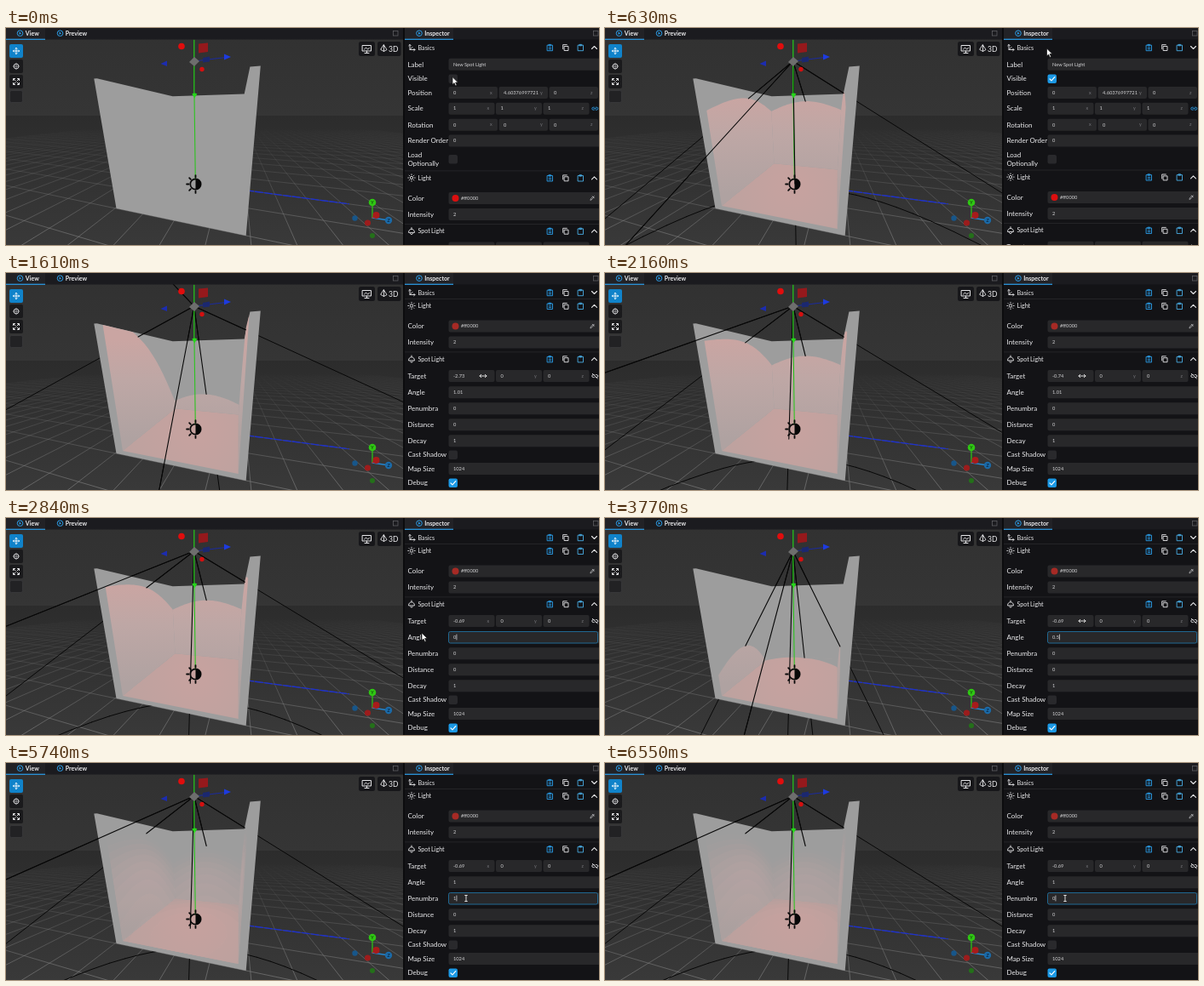
These frames come from a looping animation (696 px wide and 255 px high, 6620 ms). An HTML page:

```html
<!DOCTYPE html>
<html lang="en">
<head>
<meta charset="utf-8">
<title>Spot light editor</title>
<style>
html, body { margin: 0; width: 100%; height: 100%; overflow: hidden; background: #131316; }
svg { display: block; width: 696px; height: 255px; }
text { font-family: Lato, "Open Sans", sans-serif; font-size: 8px; fill: #ececee; }
.head { font-size: 7.2px; word-spacing: -.8px; }
.val { font-size: 5.7px; fill: #d6d6d8; }
.axis { font-size: 5.4px; fill: #77777c; }
.tab { font-weight: 700; font-size: 7px; }
.ln { fill: none; stroke-linecap: round; stroke-linejoin: round; }
</style>
</head>
<body>
<svg id="stage" viewBox="0 0 696 255" xmlns="http://www.w3.org/2000/svg"></svg>
<script>
const LOOP = 6620;
const BLUE = '#2b9de8', WHITE = '#e6e6e8';

// ---------- camera ----------
const FOCAL = 156.4, CX = 233, CY = 135, NEAR = 0.05;
const ORIGIN = [-0.356, 1.707, 5.561];
const AX = [0.2418, -0.2177, 0.9456], AZ = [0.9703, 0.0542, -0.2356], DOWN = [0, 0.9745, 0.2243];
const LIGHT_Y = 4.604, TOP = 3.72, IN = 1.86, RIGHT = 1.72, FRONT = -1.85;

const toCam = ([x, y, z]) => ORIGIN.map((o, i) => o + x * AX[i] + z * AZ[i] - y * DOWN[i]);
const toScreen = c => [CX + FOCAL * c[0] / c[2], CY + FOCAL * c[1] / c[2]];
const fmt = p => p[0].toFixed(1) + ' ' + p[1].toFixed(1);
const project = p => fmt(toScreen(toCam(p)));
const poly = pts => 'M' + pts.map(project).join('L') + 'Z';

function segment(a, b) {
  let p = toCam(a), q = toCam(b);
  if (p[2] < NEAR && q[2] < NEAR) return '';
  const cut = (f, g) => {
    const k = (NEAR - f[2]) / (g[2] - f[2]);
    return f.map((n, i) => n + (g[i] - n) * k);
  };
  if (p[2] < NEAR) p = cut(p, q);
  else if (q[2] < NEAR) q = cut(q, p);
  return 'M' + fmt(toScreen(p)) + 'L' + fmt(toScreen(q));
}

// ---------- light cone ----------
function axisOf(target) {
  const n = Math.hypot(target, LIGHT_Y);
  return [target / n, LIGHT_Y / n];
}

// Height up to which a wall column is lit
function litHeight(x, z, axis, angle) {
  const c = Math.cos(angle);
  const inside = h => (x * axis[0] + h * axis[1]) / Math.hypot(x, h, z) > c;
  let lo = LIGHT_Y - TOP, hi = LIGHT_Y;
  if (!inside(hi)) return 0;
  if (inside(lo)) return TOP;
  for (let i = 0; i < 14; i++) {
    const m = (lo + hi) / 2;
    if (inside(m)) hi = m; else lo = m;
  }
  return LIGHT_Y - hi;
}

function wallPath(at, from, to, axis, angle) {
  const pts = [];
  for (let i = 0; i <= 36; i++) {
    const [x, z] = at(from + (to - from) * i / 36);
    pts.push([x, litHeight(x, z, axis, angle), z]);
  }
  const a = at(from), b = at(to);
  return poly([...pts, [b[0], 0, b[1]], [a[0], 0, a[1]]]);
}

function floorPath(axis, angle) {
  const near = [], far = [];
  for (let i = 0; i <= 36; i++) {
    const x = FRONT + (IN - FRONT) * i / 36;
    const reach = (x * axis[0] + LIGHT_Y * axis[1]) / Math.cos(angle);
    const z2 = reach * reach - x * x - LIGHT_Y * LIGHT_Y;
    if (reach < 0 || z2 <= 0) continue;
    const z = Math.sqrt(z2);
    near.push([x, 0, -Math.min(z, IN)]);
    far.unshift([x, 0, Math.min(z, RIGHT)]);
  }
  return near.length ? poly([...near, ...far]) : '';
}

function litPaths(axis, angle) {
  return [
    floorPath(axis, angle),
    wallPath(s => [s, -IN], FRONT, IN, axis, angle),
    wallPath(s => [IN, s], -IN, RIGHT, axis, angle),
    wallPath(s => [s, RIGHT], FRONT, IN, axis, angle)
  ];
}

// Distance along a ray to the first surface of the room
function firstHit(d) {
  let best = 1000;
  const test = (t, ok) => {
    if (t > 0 && t < best && ok(d[0] * t, LIGHT_Y + d[1] * t, d[2] * t)) best = t;
  };
  test(-LIGHT_Y / d[1], (x, y, z) => Math.abs(x) < 2 && Math.abs(z) < 2);
  test(IN / d[0], (x, y, z) => y > 0 && y < TOP && Math.abs(z) < IN);
  const side = (x, y) => y > 0 && y < TOP && x > -2 && x < IN;
  test(-IN / d[2], side);
  test(RIGHT / d[2], side);
  return best;
}

function conePaths(axis, angle) {
  const w = Math.tan(angle);
  const dir = phi => [
    axis[0] + w * Math.cos(phi) * axis[1],
    -axis[1] + w * Math.cos(phi) * axis[0],
    w * Math.sin(phi)
  ];
  const at = (d, t) => [d[0] * t, LIGHT_Y + d[1] * t, d[2] * t];
  const rays = [0, 1, 2, 3].map(i => dir(i * Math.PI / 2));
  rays.push([axis[0], -axis[1], 0]);
  let back = '', front = '';
  for (const d of rays) {
    back += segment(at(d, 0), at(d, 1000));
    front += segment(at(d, 0), at(d, firstHit(d)));
  }
  for (let i = 0; i < 72; i++)
    back += segment(at(dir(i * Math.PI / 36), 1000), at(dir((i + 1) * Math.PI / 36), 1000));
  return { back, front };
}

// ---------- drawing helpers ----------
const rect = (x, y, w, h, fill, more = '') =>
  `<rect x="${x}" y="${y}" width="${w}" height="${h}" fill="${fill}" ${more}/>`;
const dot = (x, y, r, fill, more = '') => `<circle cx="${x}" cy="${y}" r="${r}" fill="${fill}" ${more}/>`;
const line = (d, color, w = 1, more = '') =>
  `<path class="ln" d="${d}" stroke="${color}" stroke-width="${w}" ${more}/>`;
const text = (x, y, s, cls = '', more = '') => `<text x="${x}" y="${y}" class="${cls}" ${more}>${s}</text>`;
const field = (x, y, w) => rect(x - .5, y - 7, w + .5, 14, '#28282a', 'rx="2"');
const label = (y, s) => text(471.5, y + 2.7, s);
const value = (x, y, s, id) => text(x, y + 1.7, s, 'val', id ? `id="${id}"` : '');
const row = (y, name, val, id) => label(y, name) + field(520, y, 178) + value(525, y, val, id);
const box = (y, on) => rect(519.5, y - 5, 10.5, 10.5, on ? '#1b98e4' : '#29292c', 'rx="2"') +
  (on ? line(`M522 ${y + .4}l2 2 3.8-4.2`, '#fff', 1.2) : '');

function triple(y, name, vals, w, id) {
  let out = label(y, name);
  vals.forEach((v, i) => {
    const x = 520 + i * (w + 2);
    out += field(x, y, w) + value(x + 5, y, v, i ? '' : id) +
      text(x + w - 9, y + 1.6, 'xyz'[i], 'axis', id && !i ? 'id="axisX"' : '');
  });
  return out;
}

function clip(x, y, color, lines) {
  return line(`M${x - 3} ${y - 2.8}h6v6.5h-6zM${x - 1.2} ${y - 3.6}h2.4v1.4h-2.4z` +
    (lines ? `M${x - 1.3} ${y}h2.6M${x - 1.3} ${y + 1.8}h2.6` : ''), color, .9);
}

const chevron = (y, up) => line(up ? `M687.5 ${y + 1.5}l3-3 3 3` : `M687.5 ${y - 1.5}l3 3 3-3`, WHITE, 1.1);
const header = (y, name, icon) => icon + text(483.5, y + 2.5, name, 'head') + clip(638.5, y, BLUE, true) +
  line(`M${655.5} ${y - 1.5}h4.5v5h-4.5zM653.7 ${y + 1.6}v-5h4.6`, WHITE, .9) + clip(674.5, y, '#4aaee6', false);

const tab = (x, s) => dot(x, 6.2, 3.3, 'none', `stroke="${BLUE}"`) +
  `<path d="M${x - 1} 4.6l2.6 1.6-2.6 1.6z" fill="${BLUE}"/>` + text(x + 6.3, 8.8, s, 'tab');
const corner = x => rect(x, 3.5, 5.5, 5.5, 'none', 'stroke="#66666a" stroke-width=".7"');

// ---------- view ----------
function grid() {
  let d = '';
  for (let i = -24; i <= 24; i++)
    d += segment([i, 0, -24], [i, 0, 24]) + segment([-24, 0, i], [24, 0, i]);
  return line(d, 'url(#gridFade)', .8);
}

const roomShape = poly([
  [-2, 0, -1.95], [-2, TOP, -1.95], [-2, TOP, -IN], [IN, TOP, -1.8], [IN, TOP, 1.77],
  [-2, TOP, RIGHT], [-2, TOP, 1.9], [-2, 0, 1.9]
]);

function ambientIcon() {
  let rays = '';
  for (let i = 2; i <= 6; i++) {
    const a = i * Math.PI / 4, c = Math.cos(a), s = Math.sin(a);
    rays += `M${222.5 + 8 * c} ${183.5 + 8 * s}l${2.4 * c} ${2.4 * s}`;
  }
  return dot(222.5, 183.5, 6.2, 'none', 'stroke="#080808" stroke-width="1.7"') +
    '<path d="M222.5 177.3a6.2 6.2 0 0 1 0 12.4z" fill="#080808"/>' + line(rays, '#080808', 1.8);
}

function gizmo() {
  return line('M221 39L258 34.5', '#1b2b9c', 1.1) +
    line('M220.8 14V79', '#22cc18', 1.2) +
    '<path d="M181.500 42l7.500-3.500v6.500z" fill="#1c2cb0"/><path d="M264 34l-8-3.500v7z" fill="#1d3be0"/>' +
    '<path d="M226 18.500l11-1v10.500l-11 1.500z" fill="#95191c"/>' +
    '<path d="M231 35l8-1.500v6l-8 1z" fill="#1b2870"/>' +
    '<path d="M221 34l6 5-6 6-6-5z" fill="#6e6e6e"/>' +
    dot(206, 21.5, 3.8, '#e00d0d') + dot(230, 48.5, 2.7, '#d41010') +
    '<path d="M218.300 77.500q3-2 6 0l-3 5z" fill="#27d61b"/>';
}

function compass() {
  return line('M430 223V207', '#2fbf17', 1.3) + line('M430 223L446 225.500', '#2386d0', 1.3) +
    line('M430 223L435 219.500', '#c02020', 1.3) +
    dot(409.5, 223.5, 3.2, '#17568a') + dot(430, 244, 3, '#24701a') + dot(424.5, 229, 3.6, '#9c1c1c') +
    dot(434.5, 220, 4, '#a81b1b') + dot(430, 205, 4.3, '#2fc713') +
    dot(449, 226, 4.2, '#1b6aa8') +
    text(430, 207, 'Y', 'axis', 'text-anchor="middle" style="fill:#0c2a08"') +
    text(449, 228, 'Z', 'axis', 'text-anchor="middle" style="fill:#06182a"');
}

function toolbar() {
  const btn = (y, fill) => rect(4, y, 16, 16, fill, 'rx="2"');
  return btn(19, '#1083ca') + btn(37, '#1a1a1c') + btn(55, '#1a1a1c') +
    rect(4.5, 73.5, 15, 14, '#222224', 'rx="2" stroke="#3d3d40" stroke-width=".7"') +
    line('M12 23.500v7M8.500 27h7M11 24.300l1-1 1 1M11 29.700l1 1 1-1M9.300 26l-1 1 1 1M14.700 26l1 1-1 1', '#fff', .9) +
    dot(12, 45, 2.9, 'none', 'stroke="#e6e6e8" stroke-width=".9"') +
    line('M8.300 45h7.400M12 41.300v7.400', '#b8b8ba', .7) +
    line('M8.500 61.500v-2h2M13.500 59.500h2v2M15.500 64.500v2h-2M10.500 66.500h-2v-2M9 60l2 2M15 60l-2 2M15 66l-2-2M9 66l2-2', WHITE, 1) +
    rect(414, 16, 19, 17, '#17171a', 'rx="2.500"') + rect(436, 16, 27.5, 17, '#17171a', 'rx="2.500"') +
    line('M418.500 20.500h10v6.500h-10zM421 29.500h5M423.500 27v2.500M420.500 25l2-2 2 2 2-1.500', WHITE, 1) +
    line('M443.500 20l3.500 5.500-3.500 2-3.500-2zM443.500 20v7.500', WHITE, .9) +
    text(449, 28.2, '3D', '', 'style="font-size:8.500px"');
}

const view = `
  ${rect(0, 0, 466, 255, 'url(#sky)')}
  ${rect(0, 103, 466, 152, 'url(#ground)')}
  <g clip-path="url(#viewClip)">
    ${grid()}
    ${line(segment([0, 0, 2], [0, 0, 5.2]), '#1b2fd0', 1.3, 'stroke-dasharray="9 2"')}
    <path id="rayBack" class="ln" stroke="#070707" stroke-width="1"/>
    <path d="${roomShape}" fill="#9d9d9d"/>
    <g id="lit"></g>
    ${line('M221 79L222.300 178', '#2cc41f', 1.1)}
    <path id="rayFront" class="ln" stroke="#070707" stroke-width="1.1"/>
    ${gizmo()}${ambientIcon()}${compass()}${toolbar()}
  </g>
  ${rect(0, 0, 466, 13.5, '#1b1b1f')}${rect(0, 0, 46, 13.5, '#222226')}
  ${tab(16.5, 'View')}${tab(63.5, 'Preview')}${rect(0, 12.7, 46, 1.2, BLUE)}${corner(454.5)}
  ${rect(466, 0, 2, 255, '#0c0c0e')}`;

// ---------- inspector ----------
const basicsIcon = line('M474 19.500v6h6M474 25.500l3-3M472.700 20.800l1.300-1.300 1.300 1.300M478.700 24.200l1.300 1.300-1.300 1.300', WHITE, .9);
const lightIcon = dot(476, 176, 1.7, 'none', 'stroke="#e6e6e8" stroke-width=".9"') +
  line('M476 171.800v.800M476 179.400v.800M471.800 176h.800M479.400 176h.800M473.100 173.100l.500.500M478.400 178.400l.500.500M473.100 178.900l.500-.500M478.400 173.600l.500-.500', WHITE, .9);
const spotIcon = line('M472.500 240c0-5 7-5 7 0zM474.500 241.500c.500 1.500 2.500 1.500 3 0M476 236v-1.500', WHITE, .9);
const link = (y, color, broken) => line(`M690.3 ${y - 1.5}h-1a1.500 1.500 0 0 0 0 3h1M692.3 ${y - 1.5}h1a1.500 1.500 0 0 1 0 3h-1` +
  (broken ? `M688.3 ${y - 2.8}l6 5.6` : `M690 ${y}h2.500`), color, .9);
const rule = y => rect(468, y, 228, .8, '#29292c');

const panel = `
  ${rect(468, 0, 228, 255, '#131316')}
  <g clip-path="url(#bodyClip)">
    ${row(42.8, 'Label', 'New Spot Light')}
    ${label(59.5, 'Visible')}<g id="visOff">${box(59.5, false)}</g><g id="visOn">${box(59.5, true)}</g>
    ${triple(76, 'Position', [0, '4.60376997721', 0], 57)}
    ${triple(94.7, 'Scale', [1, 1, 1], 53.5)}${link(94.7, BLUE)}
    ${triple(113.8, 'Rotation', [0, 0, 0], 57)}
    ${row(132.6, 'Render Order', 0)}
    ${label(149.5, 'Load')}${label(159.5, 'Optionally')}${box(154, false)}
  </g>
  ${header(23, 'Basics', basicsIcon)}<g id="open">${chevron(23, true)}</g><g id="shut">${chevron(23, false)}</g>
  <g id="lower">
    ${rule(167.5)}${header(176.3, 'Light', lightIcon)}${chevron(176.3, true)}
    ${label(200, 'Color')}${field(520, 200, 178)}<circle id="swatch" cx="527.500" cy="200" r="4"/>${value(534, 200, '#ff0000')}
    ${line('M686 202l.400-1.400 2.400-2.400 1 1-2.400 2.400zM688.300 197.700l2 2M689.300 198.700l1-1', '#c8c8ca', .7)}
    ${row(219, 'Intensity', 2)}
    ${rule(230)}${header(238.7, 'Spot Light', spotIcon)}${chevron(238.7, true)}
    ${triple(258.6, 'Target', ['0', 0, 0], 53.5, 'target')}${link(258.6, WHITE, true)}
    ${row(277.7, 'Angle', '1.01', 'angle')}
    ${row(296.7, 'Penumbra', 0, 'pen')}
    ${row(315.7, 'Distance', 0)}
    ${row(334.7, 'Decay', 1)}
    ${label(351, 'Cast Shadow')}${box(351, false)}
    ${row(367.5, 'Map Size', 1024)}
    ${label(384, 'Debug')}${box(384, true)}
  </g>
  <rect id="ring" x="519.500" width="175" height="13.500" rx="2" fill="none" stroke="#20709f" stroke-width=".9"/>
  <path id="caret" class="ln" stroke="#e6e6e8" stroke-width=".7"/>
  ${rect(468, 0, 228, 13.5, '#1b1b1f')}${rect(468, 0, 57, 13.5, '#222226')}
  ${tab(485, 'Inspector')}${rect(468, 12.7, 57, 1.2, BLUE)}${corner(689.5)}`;

const LAYERS = 12;
const stage = document.getElementById('stage');
stage.innerHTML = `<defs>
  <linearGradient id="sky" x2="0" y2="1"><stop stop-color="#313131"/><stop offset=".4" stop-color="#353535"/><stop offset="1" stop-color="#353535"/></linearGradient>
  <linearGradient id="ground" x2="0" y2="1"><stop stop-color="#2c2c2c"/><stop offset="1" stop-color="#393939"/></linearGradient>
  <linearGradient id="gridFade" gradientUnits="userSpaceOnUse" x1="0" y1="118" x2="0" y2="255">
    <stop stop-color="#777" stop-opacity="0"/><stop offset=".35" stop-color="#777" stop-opacity=".3"/><stop offset="1" stop-color="#888" stop-opacity=".75"/></linearGradient>
  <linearGradient id="wall" gradientUnits="userSpaceOnUse" x1="0" y1="78" x2="0" y2="195">
    <stop stop-color="#caa5a2"/><stop offset=".4" stop-color="#bea7a5"/><stop offset="1" stop-color="#afa2a1"/></linearGradient>
  <radialGradient id="floor" gradientUnits="userSpaceOnUse" cx="222" cy="183" r="95">
    <stop stop-color="#c7a29f"/><stop offset="1" stop-color="#bca29f"/></radialGradient>
  <clipPath id="viewClip"><rect y="13" width="466" height="242"/></clipPath>
  <clipPath id="bodyClip"><rect id="bodyRect" x="468" y="31" width="228" height="137"/></clipPath>
</defs>${view}${panel}
<path id="arrow" d="M0 0v9l2.100-1.900 1.500 3.300 1.500-.700-1.500-3.200h2.900z" fill="#fff" stroke="#111" stroke-width=".7"/>
<path id="resize" class="ln" d="M-4 0h8M-2.300-1.700l-1.700 1.700 1.700 1.700M2.300-1.700l1.700 1.700-1.700 1.700" stroke="#eee" stroke-width=".9"/>
<path id="beam" class="ln" d="M-1.300-3.500h2.600M0-3.500v7M-1.300 3.500h2.600" stroke="#eee" stroke-width=".9"/>`;

const $ = id => document.getElementById(id);
const show = (id, on) => $(id).setAttribute('display', on ? 'inline' : 'none');
$('lit').innerHTML = Array.from({ length: LAYERS }, () => '<g>' +
  ['floor', 'wall', 'wall', 'wall'].map(f => `<path fill="url(#${f})"/>`).join('') + '</g>').join('');
const layers = [...$('lit').children];

// ---------- timeline ----------
const clamp = x => Math.max(0, Math.min(1, x));
const smooth = x => x * x * (3 - 2 * x);

// Eased value from [time, value] keys
function track(keys, t) {
  if (t <= keys[0][0]) return keys[0][1];
  for (let i = 1; i < keys.length; i++) {
    const [t0, a] = keys[i - 1], [t1, b] = keys[i];
    if (t < t1) return a + (b - a) * smooth((t - t0) / (t1 - t0));
  }
  return keys[keys.length - 1][1];
}
// Latest held value
const hold = (keys, t) => keys.reduce((v, k) => t >= k[0] ? k[1] : v, keys[0][1]);

const targetKeys = [[1000, 0], [1050, -.01], [1610, -2.73], [1760, -2.95], [2200, -.69]];
const angleKeys = [[0, 1.01], [3240, .5], [4370, 1]];
const angleText = [[0, '1.01'], [2780, ''], [2840, '0'], [3170, '0.'], [3240, '0.5'], [4040, '0.'], [4180, '0'], [4250, ''], [4370, '1']];
const penText = [[0, '0'], [5670, ''], [5740, '1'], [6410, ''], [6480, '0']];
const mouseX = [[210, 524], [560, 518.5], [700, 518.5], [1000, 561], [2230, 561], [2480, 536], [2560, 536], [2760, 488],
  [3690, 488], [3770, 561], [4880, 561], [4900, 541], [5500, 540]];
const mouseY = [[210, 57.5], [560, 24], [700, 24], [1000, 121], [2230, 121], [2480, 140], [2560, 140], [2760, 135],
  [3690, 135], [3770, 121], [4880, 121], [4900, 110.5], [5000, 112], [5500, 159]];

let sceneKey = '';
function drawScene(lit, target, angle, soft) {
  const key = [lit, target, angle, soft].join();
  if (key === sceneKey) return;
  sceneKey = key;
  show('lit', lit); show('rayBack', lit); show('rayFront', lit);
  if (!lit) return;
  const axis = axisOf(target), cone = conePaths(axis, angle);
  $('rayBack').setAttribute('d', cone.back);
  $('rayFront').setAttribute('d', cone.front);
  const edge = Math.cos(angle);
  let sum = 0;
  layers.forEach((g, i) => {
    const used = soft || i === 0;
    g.setAttribute('display', used ? 'inline' : 'none');
    if (!used) return;
    const k = i / LAYERS;
    const a = soft ? Math.acos(edge + (1 - edge) * k) : angle;
    const level = soft ? smooth((i + .5) / LAYERS) : 1;
    g.setAttribute('opacity', ((level - sum) / (1 - sum)).toFixed(3));
    sum = Math.min(level, .999);
    litPaths(axis, a).forEach((d, j) => g.children[j].setAttribute('d', d));
  });
}

function render(t) {
  const on = t >= 140;
  const target = track(targetKeys, t);
  drawScene(on, target, hold(angleKeys, t), t >= 5740);

  show('visOn', on); show('visOff', !on);
  show('open', t < 620); show('shut', t >= 620);
  const fold = smooth(clamp((t - 620) / 230)) * 137.5;
  $('lower').setAttribute('transform', `translate(0 ${-fold.toFixed(2)})`);
  $('bodyRect').setAttribute('height', Math.max(0, 137 - fold));
  $('swatch').setAttribute('fill', t < 700 ? '#dc0f0f' : '#a62a25');

  $('target').textContent = t < 1010 ? '0' : target.toFixed(2);
  $('angle').textContent = hold(angleText, t);
  $('pen').textContent = hold(penText, t);

  const inAngle = t >= 2500 && t < 5600, inPen = t >= 5600;
  show('ring', inAngle || inPen);
  $('ring').setAttribute('y', inPen ? 152.5 : 133.5);

  const typed = (t >= 2780 && t < 4500) || t >= 5670;
  show('caret', typed);
  const cx = 525.6 + $(inPen ? 'pen' : 'angle').getComputedTextLength(), cy = inPen ? 159 : 140;
  $('caret').setAttribute('d', `M${cx} ${cy - 3}v6`);

  const x = track(mouseX, t), y = track(mouseY, t);
  const dragging = (t >= 960 && t < 2260) || (t >= 3750 && t < 4900);
  const beam = (t >= 2440 && t < 2640) || t >= 5300;
  const ghost = t >= 4900 && t < 4970;
  show('arrow', !dragging && !beam);
  show('resize', dragging || ghost);
  show('beam', beam);
  show('axisX', !dragging);
  $('arrow').setAttribute('transform', `translate(${x} ${y})`);
  $('beam').setAttribute('transform', `translate(${x} ${y})`);
  $('resize').setAttribute('transform', 'translate(560 121)');
}

const start = performance.now();
function tick() {
  render((performance.now() - start) % LOOP);
  requestAnimationFrame(tick);
}
render(0);
requestAnimationFrame(tick);
</script>
</body>
</html>
```
